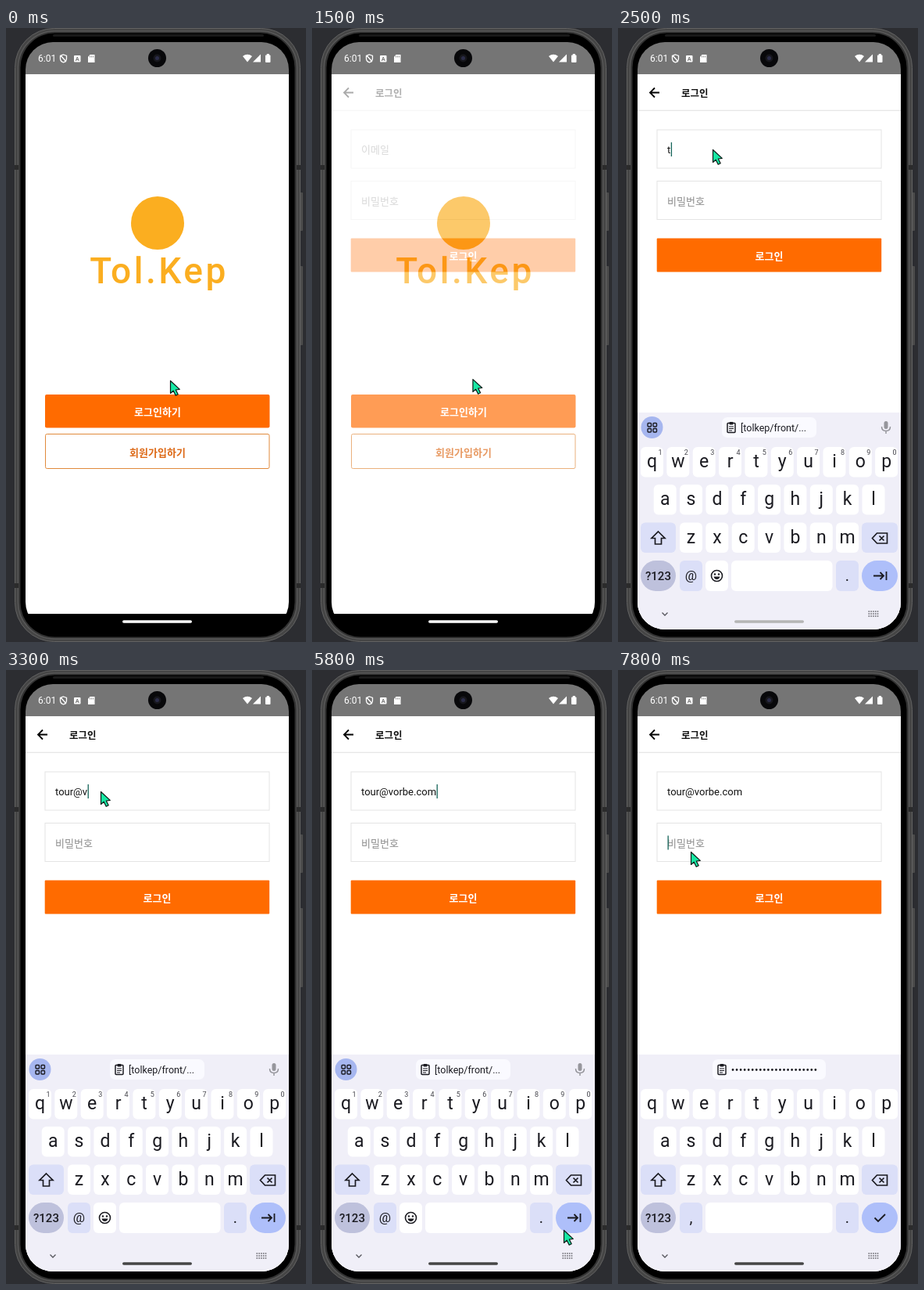
Animation of 384 by 784 pixels, one loop 8000 ms. Source, as an HTML page:

```html
<!DOCTYPE html>
<html lang="ko">
<head>
<meta charset="utf-8">
<title>Login</title>
<style>
  html, body { margin: 0; width: 100%; height: 100%; overflow: hidden; background: #2c2d31; }
  svg { display: block; }
  text { font-family: Roboto, "Noto Sans CJK KR", "Noto Sans CJK", sans-serif; white-space: pre; }
</style>
</head>
<body>
<svg width="384" height="784" viewBox="0 0 384 784">
  <defs>
    <clipPath id="screen"><rect x="25" y="18" width="337" height="750" rx="35"/></clipPath>
  </defs>
  <g id="phone"></g>
  <g id="display" clip-path="url(#screen)"></g>
  <g id="pointer"></g>
</svg>
<script>
const LOOP = 8000, STEP = 100;
const ORANGE = '#ff6b00', AMBER = '#fbae20', INK = '#1b1b21', KEY_TINT = '#dbdff8';
const EMAIL = 'tour@vorbe.com';
const KEY_TIMES = [2400, 2600, 2800, 2900, 3100, 3300, 3400, 3600, 3800, 3900, 4100, 4200, 4300, 4500];
// time, x, y of the pointer tip
const POINTER = [
  [0, 210, 450], [200, 317, 528], [400, 235, 480], [500, 235, 480], [800, 215, 487],
  [1400, 215, 487], [1900, 123, 113], [2300, 121, 155], [4900, 121, 155], [5600, 338, 720],
  [5800, 322, 715], [6100, 334, 702], [6300, 334, 702], [7200, 70, 235], [7500, 8, 236], [7800, 93, 232]
];

const el = id => document.getElementById(id);
const pen = document.createElement('canvas').getContext('2d');
const clamp = v => Math.max(0, Math.min(1, v));
const ramp = (t, from, to) => clamp((t - from) / (to - from));
const ease = p => p * p * (3 - 2 * p);

const rect = (x, y, w, h, fill, rx = 0, extra = '') =>
  `<rect x="${x}" y="${y}" width="${w}" height="${h}" rx="${rx}" fill="${fill}" ${extra}/>`;
const circle = (x, y, r, fill, extra = '') => `<circle cx="${x}" cy="${y}" r="${r}" fill="${fill}" ${extra}/>`;
const text = (s, x, y, size, fill, extra = '') =>
  `<text x="${x}" y="${y}" font-size="${size}" fill="${fill}" ${extra}>${s}</text>`;
const centred = (s, x, y, size, fill, weight = 400) =>
  text(s, x, y, size, fill, `text-anchor="middle" font-weight="${weight}"`);
const shape = (d, fill) => `<path d="${d}" fill="${fill}"/>`;
const line = (d, stroke = INK, width = 1.7, extra = '') =>
  `<path d="${d}" fill="none" stroke="${stroke}" stroke-width="${width}" ${extra}/>`;
const group = (s, attrs) => `<g ${attrs}>${s}</g>`;

function phone() {
  const notch = (x, y) => rect(x, y, 5, 6, '#2b2b2b');
  return rect(376, 210, 4, 49, '#4c4c4c', 1) + rect(376, 304, 4, 101, '#4c4c4c', 1) +
    rect(11.5, 0.5, 365, 783, '#454545', 50, 'stroke="#626262"') +
    rect(15.5, 4, 357, 776, '#333', 47, 'stroke="#585858" stroke-width="1.5"') +
    rect(18.5, 6.5, 351, 771, '#000', 44) +
    rect(60, 8, 270, 3, '#191919', 1.5) +
    [175, 709].map(y => notch(11, y) + notch(372, y)).join('');
}

function statusBar() {
  return rect(25, 18, 337, 41, '#757575') + text('6:01', 41, 43, 12, '#fff') +
    line('M73.5 34l4 1.5v3.5q0 3.5-4 5q-4-1.5-4-5v-3.5zM70 35l7 8', '#fff', 1.3) +
    rect(87, 35, 8.5, 8.5, '#fff', 1) + centred('A', 91.3, 42, 7.5, '#757575', 700) +
    shape('M107.5 34h6v10h-8.5v-7z', '#fff') + line('M107.5 35.5v2m2-2v2m2-2v2', '#757575', 0.8) +
    shape('M303 36q6-4.5 12 0l-6 7.5z', '#fff') + shape('M316 43.5h10v-10z', '#fff') +
    rect(332, 34.5, 6.5, 9.5, '#fff', 1) + rect(333.8, 33, 3, 2, '#fff') +
    circle(193.5, 38.5, 11.5, '#08080a') + circle(193.5, 38.5, 5, '#17171c') +
    circle(193.5, 38.5, 2.5, '#2b2c48');
}

function welcome(t) {
  const pressed = t >= 900 && t < 1400;
  return rect(25, 59, 337, 689, '#fff') +
    circle(194, 249, 34, AMBER) +
    text('Tol.Kep', 196, 326, 46, AMBER, 'text-anchor="middle" font-weight="500" letter-spacing="3.5"') +
    rect(50, 468, 287.5, 42.5, pressed ? AMBER : ORANGE, 2) + centred('로그인하기', 194, 495, 13, '#fff', 700) +
    rect(50.5, 518.5, 286.5, 44, '#fff', 2, 'stroke="#e08a3c"') +
    centred('회원가입하기', 194, 546.5, 13, '#dd6a18', 700);
}

function field(y, value, hint, caret) {
  pen.font = '13px Roboto, sans-serif';
  const end = 63.5 + pen.measureText(value).width;
  return rect(50, y, 287, 49, '#fff', 0, 'stroke="#e4e4e4"') +
    text(value || hint, 63, y + 30, 13, value ? '#111' : '#8c8c8c') +
    (caret ? rect(end, y + 16, 1.3, 18, '#16655a') : '');
}

function caretOn(t, typed) {
  const lastKey = typed ? KEY_TIMES[typed - 1] : 2000;
  return t >= 2000 && t < 6100 && (t - lastKey) % 1000 < 500;
}

function login(t) {
  const typed = KEY_TIMES.filter(k => k <= t).length;
  const passwordCaret = t >= 6400 && (t - 6400) % 1000 < 500;
  return rect(25, 59, 337, 709, '#fff') + rect(25, 104.7, 337, 1.3, '#e6e6e6') +
    (t >= 1700 ? rect(25, 491, 337, 277, '#f9f9f9') : rect(25, 748, 337, 20, '#000')) +
    line('M53 82.5H41.5M47 76.5l-6 6l6 6', '#000', 1.8) +
    text('로그인', 81, 88, 12.5, '#111', 'font-weight="700"') +
    field(130, EMAIL.slice(0, typed), '이메일', caretOn(t, typed)) +
    field(195.5, '', '비밀번호', passwordCaret) +
    rect(49.7, 268.5, 287.5, 43, ORANGE, 1) + centred('로그인', 193.5, 296, 13, '#fff', 700);
}

const clipboard = x => rect(x - 5, 504.5, 10, 12, 'none', 1, `stroke="${INK}" stroke-width="1.5"`) +
  rect(x - 2.5, 503, 5, 3.5, INK, 1) + line(`M${x - 3} 509h6m-6 2.5h6m-6 2.5h4`, INK, 1.1);

function topStrip(mode) {
  if (mode === 'plain')
    return [...'1234567890'].map((d, i) => centred(d, 43.5 + 33.35 * i, 516, 18, INK)).join('');
  if (mode === 'password')
    return rect(121, 497, 145, 26, '#fafaff', 7) + clipboard(133) +
      line('M147 510.5H253', INK, 2.8, 'stroke-linecap="round" stroke-dasharray="0 5.04"');
  const dots = [[38, 504.5], [45, 504.5], [38, 511.5], [45, 511.5]]
    .map(([x, y]) => rect(x, y, 4.5, 4.5, 'none', 1, `stroke="${INK}" stroke-width="1.4"`)).join('');
  return circle(43.5, 510, 14, '#a6b6ef') + dots +
    rect(133, 497, 121, 26, '#fafaff', 7) + clipboard(145) +
    text('[tolkep/front/...', 157, 514.5, 12.5, INK) +
    rect(340.5, 502, 5, 10, '#96969c', 2.5) +
    line('M337.5 509q0 5.5 5.5 5.5t5.5-5.5M343 514.5v3.5', '#96969c', 1.5);
}

function keyRow(letters, x0, y, hints) {
  return [...letters].map((c, i) => {
    const x = x0 + 33.35 * i;
    return rect(x, y, 29, 38.5, '#fff', 6) + centred(c, x + 14.5, y + 26, 23, INK) +
      (hints ? centred((i + 1) % 10, x + 25, y + 10, 9, '#44444c') : '');
  }).join('');
}

function keyboard(t) {
  const mode = t < 2100 ? 'plain' : t < 6400 ? 'email' : 'password';
  const email = mode === 'email';
  const slide = 277 * (1 - ramp(t, 1600, 2000)) ** 1.95;
  const action = {
    plain: 'M342.5 694v5.5h-14M332.5 695l-4.5 4.5l4.5 4.5',
    email: 'M327 699.5h13M335.5 695l4.5 4.5l-4.5 4.5M343.5 694v11',
    password: 'M328.5 699.5l4.5 4.5l9-9'
  }[mode];
  const keys = rect(25, 491, 337, 300, '#f0eff8') + topStrip(mode) +
    keyRow('qwertyuiop', 29, 535, email) + keyRow('asdfghjkl', 45.7, 583, false) + keyRow('zxcvbnm', 79, 631.5, false) +
    rect(29, 631.5, 45, 38.5, KEY_TINT, 6) + line('M51.5 643l8.5 8.5h-4.5v7.5h-8v-7.5h-4.5z') +
    rect(312, 631.5, 46, 38.5, KEY_TINT, 6) +
    line('M331.5 645h13v13h-13l-6-6.5zM334.5 648.5l6 6m0-6l-6 6') +
    rect(29, 680, 45, 39, '#bec1dc', 19.5) + centred('?123', 51.5, 704.5, 15, INK, 500) +
    rect(79, 680, 29, 39, KEY_TINT, 6) +
    (email
      ? centred('@', 93.5, 704.5, 17, INK) + rect(112, 680, 29, 39, '#fff', 6) +
        circle(126.5, 699.5, 7, 'none', `stroke="${INK}" stroke-width="1.6"`) +
        circle(124, 697.5, 1.2, INK) + circle(129, 697.5, 1.2, INK) +
        shape('M122.5 700.5h8q-1 3.5-4 3.5t-4-3.5z', INK) + rect(145, 680, 129.5, 39, '#fff', 6)
      : centred(',', 93.5, 705.5, 20, INK) + rect(112, 680, 162.5, 39, '#fff', 6)) +
    rect(279, 680, 29, 39, KEY_TINT, 6) + centred('.', 293.5, 705.5, 20, INK) +
    rect(312, 680, 46, 39, '#aebffa', 19.5) + line(action, INK, 1.8) +
    line('M56.5 746.5l3.5 3.5l3.5-3.5', '#55555c', 1.3) +
    line('M320.5 745h13m-13 3h13m-13 3h13', '#66666c', 1.5, 'stroke-dasharray="1.6 1.2"');
  return group(keys, `transform="translate(0 ${slide})"`);
}

function homePill(t) {
  const v = Math.round(255 - 185 * ramp(t, 2300, 2800));
  return rect(149, 756.3, 89, 3.5, `rgb(${v},${v},${v})`, 1.75);
}

function pointerAt(t) {
  const next = POINTER.findIndex(p => p[0] > t);
  if (next < 0) return POINTER.at(-1).slice(1);
  const [a, b] = [POINTER[next - 1], POINTER[next]];
  const p = ease(ramp(t, a[0], b[0]));
  return [1, 2].map(i => a[i] + (b[i] - a[i]) * p);
}

function render(t) {
  el('display').innerHTML = rect(25, 18, 337, 750, '#000') + statusBar() +
    (t < 1700 ? welcome(t) : '') +
    (t > 1400 ? group(login(t), `opacity="${ramp(t, 1400, 1700)}"`) : '') +
    (t > 1600 ? keyboard(t) : '') + homePill(t);
  el('pointer').setAttribute('transform', `translate(${pointerAt(t)})`);
}

el('phone').innerHTML = phone();
el('pointer').innerHTML =
  '<path d="M.5.5v16l3.7-3.3l3 6l3-1.5l-2.9-5.7l5-.6z" fill="#17e8a4" stroke="#0c1a16" stroke-width="1.2" stroke-linejoin="round"/>';

let shown = -1;
function tick() {
  const t = Math.floor(performance.now() % LOOP / STEP) * STEP;
  if (t !== shown) render(shown = t);
  requestAnimationFrame(tick);
}
tick();
</script>
</body>
</html>
```
